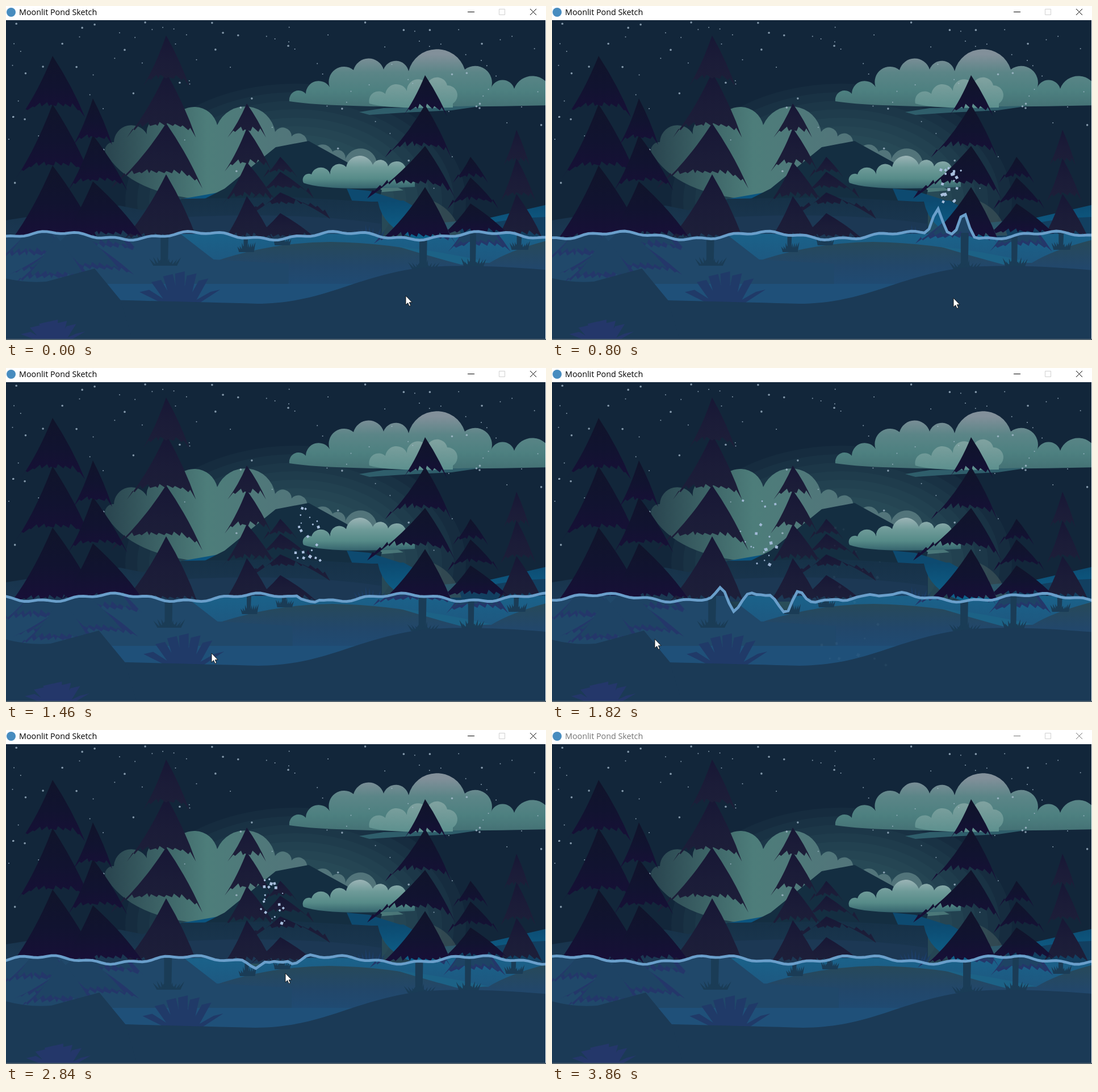
An HTML page that plays this animation: 951x589 px, repeating every 3.96 s.

```html
<!DOCTYPE html>
<html lang="en">
<head>
<meta charset="utf-8">
<title>Moonlit Pond Sketch</title>
<style>
html, body { margin: 0; width: 100%; height: 100%; overflow: hidden; background: #fff; }
svg { display: block; width: 100vw; height: 100vh; }
text { font: 14.3px "Open Sans", "Noto Sans", sans-serif; }
</style>
</head>
<body>
<svg id="stage" viewBox="0 0 951 589" preserveAspectRatio="none"></svg>
<script>
const LOOP = 3960, TAU = Math.PI * 2;
const stage = document.getElementById('stage');

// Repeatable pseudo-random value in 0..1
const rnd = n => { const s = Math.sin(n * 127.1 + 3.7) * 43758.5453; return s - Math.floor(s); };
const r1 = n => n.toFixed(1);
const lerp = (a, b, k) => a + (b - a) * k;
const repeat = (n, fn) => Array.from({ length: n }, (_, i) => fn(i)).join('');
const shape = (d, fill, opacity = 1) => `<path d="${d}" fill="${fill}" opacity="${opacity}"/>`;

const gradient = (id, colors, span = 'x1="0" y1="0" x2="0" y2="1"') =>
  `<linearGradient id="${id}" ${span}>` + colors.map((c, i) =>
    `<stop offset="${i / (colors.length - 1)}" stop-color="${c}"/>`).join('') + '</linearGradient>';
const down = (y1, y2) => `gradientUnits="userSpaceOnUse" x1="0" y1="${y1}" x2="0" y2="${y2}"`;

// Layer of fir branches: left side sweeps in, right side bulges, ragged hem
function layer(x, top, tip, left, right, lift, fill) {
  const n = Math.max(5, Math.round((left + right) / 13)), h = tip - top;
  const hem = f => [lerp(x - left, x + right, f), tip - lift * (1 - (2 * f - 1) ** 4)];
  let d = `M${x} ${top}Q${x - left * .46} ${r1(top + h * .6)} ${x - left} ${r1(tip)}`;
  for (let i = 1; i <= n; i++) {
    const lean = i / n < .5 ? .25 : -.25;
    const [ax, ay] = hem((i - .5 + lean) / n), [bx, by] = hem(i / n);
    d += `L${r1(ax)} ${r1(ay - 2 - rnd(i + x) * 7)}L${r1(bx)} ${r1(by)}`;
  }
  return shape(d + `Q${x + right * .62} ${r1(top + h * .5)} ${x} ${top}Z`, fill);
}

// Fir: layers widen downwards, the lowest of four is drawn in again
function tree(fill, x, top, base, layers, crown, left, right) {
  const h = base - top;
  const parts = Array.from({ length: layers }, (_, i) => {
    const last = i === layers - 1;
    const k = last && layers > 3 ? .6 : Math.min(1, i / 2);
    const l = lerp(crown, left, k), r = lerp(crown, right, k);
    const start = i ? top + h * (i / layers - .07) : top;
    return layer(x, start, top + h * (i + 1) / layers, l, r, last ? 5 : (l + r) * .17, `url(#${fill})`);
  });
  return parts.reverse().join('');
}

// Cloud: one puff between each pair of skyline points, gently rounded base
function cloud(fill, points, base, sag = 8) {
  let d = `M${points[0]}`;
  points.slice(1).forEach(([x, y], i) => {
    const r = r1(Math.hypot(x - points[i][0], y - points[i][1]) * .52);
    d += `A${r} ${r} 0 0 1 ${x} ${y}`;
  });
  const [x0, y0] = points[0], x1 = points[points.length - 1][0];
  return shape(d + `V${base}Q${lerp(x0, x1, .2)} ${base + sag} ${x0} ${y0}Z`, `url(#${fill})`);
}

function grass(x, y, w, h, fill = '#1a3c56') {
  return shape(repeat(9, i => {
    const k = i / 4 - 1, b = x + k * w * .32;
    return `M${b - 3} ${y}L${r1(x + k * w / 2)} ${r1(y - h * (.5 + rnd(i + x) * .5))}L${b + 3} ${y}Z`;
  }), fill);
}
function trunk(x, h, w) {
  const y = 400, b = y + h;
  return shape(`M${x - w / 2} ${y}h${w}L${x + w / 2 - 1} ${b - 7}L${x + w} ${b}h${-2 * w}L${x - w / 2} ${b - 9}Z`, '#1a3c56');
}
function agave(x, y, w, h, fill) {
  return shape(repeat(7, i => {
    const k = i / 3 - 1, b = x + k * w * .2;
    const tx = x + k * w * .46, ty = y - h * (1 - .6 * k * k) + rnd(i) * 5;
    return `M${r1(b - 7)} ${y}L${r1(tx - 9)} ${r1(ty + 4)}L${r1(tx + 8)} ${r1(ty)}L${r1(b + 8)} ${y}Z`;
  }), fill);
}
// Mirrored lower branches: violet tips around a bluish core
const skirt = (x, tip, left, right) => layer(x, tip - 75, tip, left, right, 10, '#24376a') +
  layer(x, tip - 85, tip - 10, left * .75, right * .75, 6, '#1e4364');

const stars = repeat(115, i => {
  const y = 29 + 300 * rnd(i + .5) ** 1.5, big = i % 3 === 0;
  return `<circle cx="${r1(rnd(i) * 950)}" cy="${r1(y)}" r="${big ? 1.8 : 1}" fill="#a9bfd0" opacity=".75"/>`;
});
const halo = repeat(9, i =>
  `<ellipse cx="510" cy="345" rx="${300 - i * 21}" ry="${208 - i * 15}" fill="#4f8580" opacity=".07"/>`);

const defs = '<defs>' +
  gradient('night', ['#10142a', '#111330', '#180f38']) +
  gradient('dusk', ['#171735', '#1b1c38', '#1d1f39']) +
  gradient('mist', ['#2a4650', '#4d7d7a', '#52747a'], 'gradientUnits="userSpaceOnUse" x1="180" y1="0" x2="530" y2="0"') +
  gradient('high', ['#82909a', '#5b8587', '#4d8080', '#436f73'], down(85, 182)) +
  gradient('pale', ['#7ea19f', '#5b8f8d'], down(130, 182)) +
  gradient('low', ['#9bb4b6', '#6f9b99', '#568b88', '#2f5c68'], down(264, 325)) +
  gradient('bay', ['#0c4a70', '#0e628c']) +
  gradient('hill', ['#163147', '#1b3853']) +
  gradient('deep', ['#1a628a', '#1d5a82', '#1f4f78', '#1f5280'], down(400, 525)) +
  gradient('bank', ['#27495a', '#22476a', '#1f4b74'], down(416, 500)) +
  '<clipPath id="view"><path d="M0 25H950V587H0Z"/></clipPath>' +
  '<clipPath id="pool"><path id="poolEdge"/></clipPath></defs>';

const sky = shape('M0 25H950V587H0Z', '#12263a') + halo +
  cloud('mist', [[180, 266], [190, 240], [248, 226], [292, 206], [372, 210], [474, 222], [503, 230], [530, 242]], 335, 35) +
  cloud('high', [[499, 168], [528, 155], [570, 143], [612, 113], [665, 112], [709, 115], [808, 112], [854, 146], [895, 146], [960, 150]], 175) +
  shape('M622 187L665 180L840 176L785 184L700 188L640 192Z', '#2f5e6b') +
  cloud('pale', [[640, 172], [668, 155], [706, 150], [742, 138], [777, 140], [787, 172]], 179, 3) +
  stars +
  cloud('mist', [[540, 258], [575, 257], [597, 272], [652, 272]], 300) +
  shape('M600 275L700 325L640 330Z', '#5a8c88', .7) +
  shape('M305 341L362 331L430 318L480 335V348H305Z', '#0b5580') +
  shape('M340 345L385 322L475 249L533 238L600 275L662 325L655 350Z', '#142e41') +
  cloud('low', [[524, 312], [538, 297], [571, 297], [599, 284], [646, 280], [673, 283], [705, 290], [720, 312]], 319) +
  shape('M600 322L640 326L700 345H610Z', '#0d4a70') +
  shape('M0 378Q110 360 200 352L240 360L310 340L500 337L662 346V410H0Z', 'url(#hill)') +
  shape('M655 345L700 343L770 382L850 374L950 351V410H720Q664 392 655 345Z', 'url(#bay)') +
  shape('M780 400Q870 374 950 372V410H780Z', '#123f60') +
  shape('M742 340Q790 355 802 405H752Z', '#42585a', .6) +
  shape('M260 375Q500 360 660 384V412H260Z', '#1c3854') +
  grass(640, 412, 55, 28, '#1c3d66');

const woods =
  tree('dusk', 282, 52, 412, 4, 41, 97, 64) +
  tree('night', 82, 88, 412, 3, 57, 72, 80) +
  tree('night', 153, 163, 408, 3, 34, 54, 88) +
  tree('dusk', 483, 266, 412, 4, 30, 66, 88) +
  tree('dusk', 424, 172, 412, 4, 34, 44, 54) +
  tree('dusk', 899, 218, 408, 3, 23, 33, 45) +
  tree('night', 738, 122, 412, 4, 39, 102, 53) +
  tree('night', 818, 266, 404, 3, 31, 50, 68);

// Submerged parts sway sideways, each by its own place
const sway = (x, body) => `<g class="sway" data-x="${x}">${body}</g>`;
const rooted = (x, h, w) => sway(x, trunk(x, h, w) + grass(x + 1, 402 + h, w * 4, 18));
const water = shape('M0 300H950V404H0Z', '#1b6a98', .3) +
  shape('M0 402H950V587H0Z', 'url(#deep)') +
  sway(560, shape('M340 460Q450 417 570 416Q690 418 790 446L850 453Q890 428 970 409V500H340Z', 'url(#bank)') +
    shape('M688 424Q760 432 850 452L800 456Q740 440 688 424Z', '#1c6286')) +
  sway(300, shape('M-20 402H310L368 447L500 455V490H-20Z', '#20486a')) +
  sway(120, skirt(60, 450, 72, 60) + skirt(160, 436, 60, 80) + skirt(125, 474, 115, 105) + skirt(92, 490, 72, 70)) +
  sway(732, skirt(730, 419, 86, 58)) + sway(822, skirt(822, 433, 48, 62)) +
  rooted(282, 56, 14) + rooted(423, 32, 8) + rooted(485, 20, 8) +
  rooted(731, 62, 14) + rooted(818, 58, 11) + rooted(899, 28, 9) +
  sway(308, shape('M170 490H700V530H170Z', '#1f5079') + agave(309, 523, 136, 58, '#203a68')) +
  sway(560, shape('M170 518Q330 522 440 525C550 524 600 485 700 466Q780 450 970 467V600H170Z', '#1b3a56')) +
  sway(180, shape('M-20 474Q30 490 75 486L160 463L206 519L230 600H-20Z', '#1b3a56')) +
  sway(88, agave(88, 590, 105, 40, '#24376a'));

stage.innerHTML = defs + shape('M0 0H951V589H0Z', '#fff') + shape('M0 587H951V589H0Z', '#53636f') +
  `<g clip-path="url(#view)">${sky}${woods}<g clip-path="url(#pool)">${water}</g>
  <path id="crest" fill="none" stroke="#6a9fcb" stroke-width="4.8"/>
  <g id="spray" fill="#a9c0de"></g></g>
  <circle cx="9" cy="11" r="8" fill="#478cbf"/>
  <g id="bar" fill="#000" stroke="#000"><text x="23" y="16" stroke="none">Moonlit Pond Sketch</text>
  <path d="M813 10.5H825M923 5L934 16M934 5L923 16" fill="none"/></g>
  <path d="M868.5 5.5h10v10h-10z" fill="none" stroke="#d0d0d0"/>
  <path id="mouse" d="M0 0V16L3.7 12.6L6.2 18.3L8.7 17.2L6.3 11.7H11.2Z" fill="#fff" stroke="#111" stroke-width=".9"/>`;

const el = id => document.getElementById(id);
const poolEdge = el('poolEdge'), crest = el('crest'), spray = el('spray'), bar = el('bar'), mouse = el('mouse');
const swaying = [...document.querySelectorAll('.sway')];

const LIFE = 600;
const clicks = [[650, 702], [1240, 532], [1530, 366], [1960, 152], [2610, 475]];
const route = [[0, 704, 511], [800, 707, 515], [1100, 543, 528], [1820, 181, 478],
  [1960, 152, 474], [2360, 391, 453], [2840, 492, 429], [3780, 525, 592], [LOOP, 525, 600]];

function mouseAt(t) {
  const i = route.findIndex(p => p[0] > t);
  const [a, x, y] = route[i - 1], [b, u, v] = route[i], k = (t - a) / (b - a);
  return [lerp(x, u, k), lerp(y, v, k)];
}

const bell = u => Math.exp(-u * u);

// Two packets run outwards from the click while they swing up, then down
function splash(x, x0, age) {
  if (age < 0 || age > LIFE) return 0;
  const fade = Math.min(1, age / 80) * (1 - (age / LIFE) ** 4);
  const amp = 105 * fade * Math.exp(-age / 320) * Math.cos(TAU * (age - 80) / 560);
  const dist = Math.abs(x - x0), front = age * .155;
  const ripple = dist < front ? 5 * fade * (age / LIFE) * Math.sin(dist * .24 + age * .012) : 0;
  return amp * bell((dist - front) / 12) - .5 * Math.min(0, amp) * bell((dist - front - 24) / 10) + ripple;
}

function surface(x, t) {
  const swell = 6 * Math.cos(TAU * (x - 85 + .276 * t) / 254) + 2.2 * Math.cos(TAU * (x - .478 * t) / 63.5);
  return clicks.reduce((y, [t0, x0]) => y - splash(x, x0, t - t0), 405 - swell);
}

function drops(x0, age, seed) {
  if (age < 0 || age > LIFE) return '';
  const d = repeat(20, i => {
    const k = seed * 50 + i * 4;
    const x = x0 + (rnd(k) - .5) * .22 * age + (rnd(k + 1) - .5) * 10;
    const y = 405 - (.6 + rnd(k + 2) * .43) * age + .0014 * age * age;
    const s = 1.3 + rnd(k + 3) * 2.6, a = rnd(k + 5) * TAU + age * .004;
    const c = s * Math.cos(a), n = s * Math.sin(a);
    return `M${r1(x + c)} ${r1(y + n)}L${r1(x - n)} ${r1(y + c)}L${r1(x - c)} ${r1(y - n)}L${r1(x + n)} ${r1(y - c)}Z`;
  });
  return shape(d, 'inherit', Math.min(1, (LIFE - age) / 340).toFixed(2));
}

function draw(t) {
  const line = 'M' + Array.from({ length: 122 }, (_, i) => `${i * 8 - 8} ${r1(surface(i * 8 - 8, t))}`).join('L');
  crest.setAttribute('d', line);
  poolEdge.setAttribute('d', line + 'V590H-8Z');
  for (const g of swaying) {
    const dx = 5 * Math.cos(TAU * (t - 560 + .6 * g.dataset.x) / 1150);
    g.setAttribute('transform', `translate(${r1(dx)} 0)`);
  }
  spray.innerHTML = clicks.map(([t0, x0], i) => drops(x0, t - t0, i + 1)).join('');
  mouse.setAttribute('transform', `translate(${mouseAt(t).map(r1)})`);
  const active = t < 3860;
  bar.setAttribute('opacity', active ? 1 : .55);
  mouse.setAttribute('opacity', active ? 1 : 0);
}

// The picture steps every 60 ms, with one short step before 560 and a long last one
const step = t => t < 560 ? t - t % 60 : Math.min(3860, t - (t - 560) % 60);

const start = performance.now();
function tick() {
  draw(step((performance.now() - start) % LOOP));
  requestAnimationFrame(tick);
}
tick();
</script>
</body>
</html>
```
